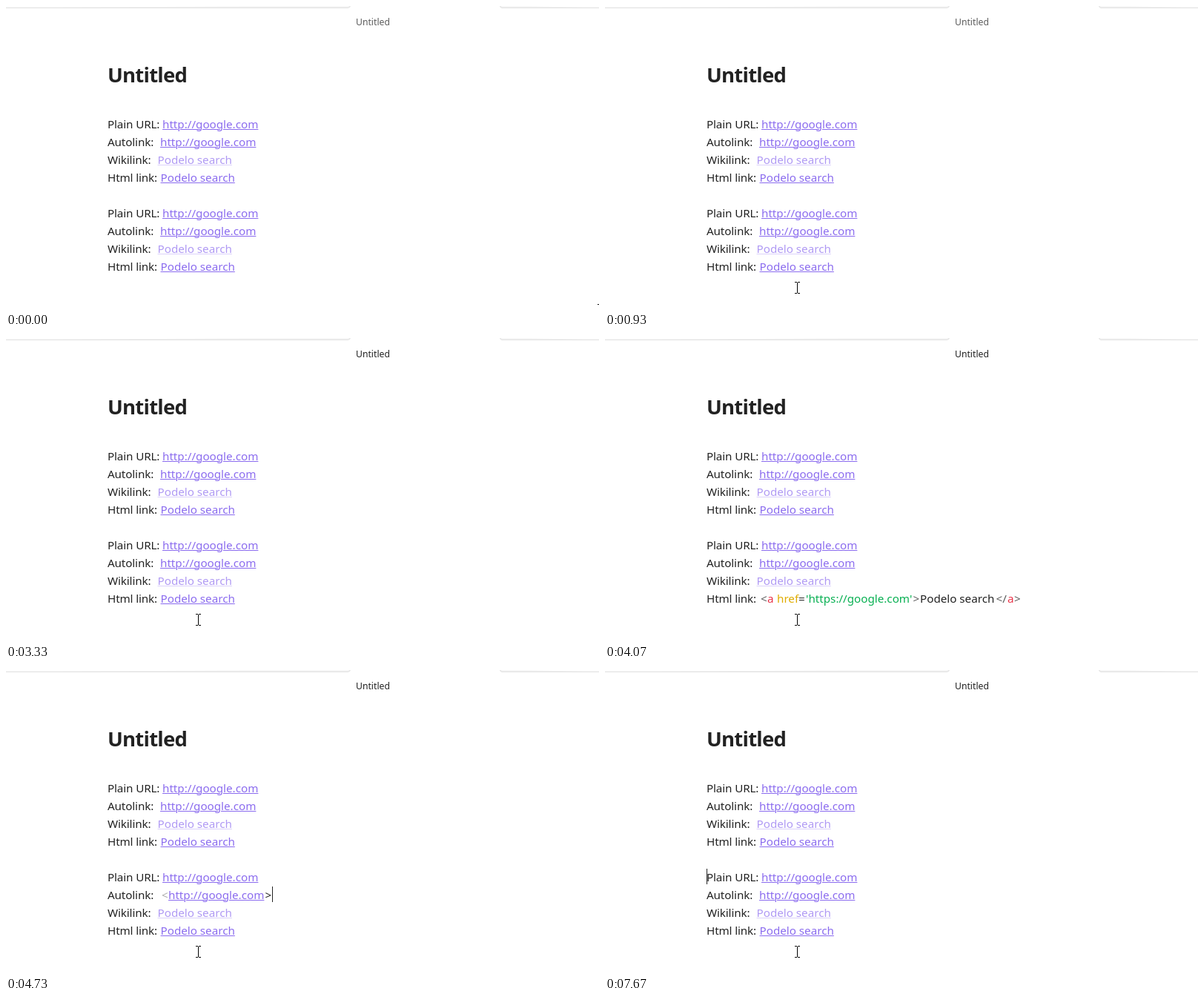
An HTML page that plays this animation: 800 by 410 pixels, repeating every 8000 ms.

```html
<!DOCTYPE html>
<html lang="en">
<head>
<meta charset="utf-8">
<title>Link editing</title>
<style>
  html, body { margin: 0; width: 100%; height: 100%; overflow: hidden; background: #fff; }
  #stage { position: relative; width: 800px; height: 410px; overflow: hidden;
    font: 15.2px/24px "Noto Sans", sans-serif; color: #222; }
  #stage > svg, #stage span, #caret, h1 { position: absolute; margin: 0; white-space: pre; }
  h1 { left: 137px; top: 73px; font-size: 27.5px; line-height: 40px; letter-spacing: -.75px; }
  #stage #tab { left: 472px; top: 9.5px; font-size: 12.2px; }
  #caret { width: 1px; height: 21px; background: #222; }
  .name { letter-spacing: -.12px; }
  .link, .wiki { text-decoration: underline 1px; text-underline-offset: 1px; }
  .link { color: #8b6cef; }
  .wiki { color: #b09af4; text-decoration-color: #dcd2fb; }
  .faint { color: #ababab; }
  .mark { color: #5c5c5c; }
  .tag { color: #e93147; }
  .attr { color: #e0ac00; }
  .string { color: #08b052; }
</style>
</head>
<body>
<div id="stage">
  <svg width="800" height="4" fill="#f6f6f6" stroke="#dedede">
    <path d="M-1 2.5H461Q464.5 2.5 464.5-1M801 2.5H669Q666.5 2.5 666.5-1"/>
  </svg>
  <span id="tab">Untitled</span>
  <h1>Untitled</h1>
  <div id="caret"></div>
  <svg id="pointer" width="7" height="16" fill="#000">
    <path d="M0 0h3v1H0zM4 0h3v1H4zM3 1h1v14H3zM0 15h3v1H0zM4 15h3v1H4z"/>
  </svg>
</div>
<script>
const LOOP = 8000, STEP = 1000 / 15;
const URL_TEXT = 'http://google.com', LABEL = 'Podelo search';
const $ = id => document.getElementById(id);
const stage = $('stage'), tab = $('tab'), caret = $('caret'), pointer = $('pointer');

// Pieces are [text, x, class]
const lines = [
  { name: 'Plain URL:', view: [[URL_TEXT, 211, 'link']] },
  { name: 'Autolink:', view: [[URL_TEXT, 208, 'link']],
    code: [['<', 210, 'faint'], [URL_TEXT, 219, 'link'], ['>', 349.5, '']] },
  { name: 'Wikilink:', view: [[LABEL, 204.5, 'wiki']],
    code: [['[[', 204.5, 'faint'], [URL_TEXT, 214.5, 'wiki'], ['|', 343, 'faint'],
           [LABEL, 347.5, 'wiki'], [']]', 448, 'faint']] },
  { name: 'Html link:', view: [[LABEL, 208.5, 'link']],
    code: [['<', 210, 'mark'], ['a', 219, 'tag'], ['href', 232, 'attr'], ['=', 261, ''],
           ["'https://google.com'", 271, 'string'], ['>', 415.5, 'mark'], [LABEL, 425, ''],
           ['</', 527.5, 'mark'], ['a', 543, 'tag'], ['>', 552, 'mark']] }
];

function addPieces(pieces, top) {
  const group = stage.insertBefore(document.createElement('div'), caret);
  for (const [text, x, kind] of pieces) {
    const span = group.appendChild(document.createElement('span'));
    span.textContent = text;
    span.className = kind;
    span.style.left = x + 'px';
    span.style.top = top + 'px';
  }
  return group;
}

for (const top of [147, 267]) {
  lines.forEach((line, i) => {
    const y = top + 24 * i;
    addPieces([[line.name, 137, 'name']], y);
    line.viewGroup = addPieces(line.view, y);
    if (top === 267 && line.code) line.codeGroup = addPieces(line.code, y);
  });
}

// [start, caret x, caret y, expanded line]; no x means a hidden caret
const states = [
  [0], [1470, 137, 364], [2000], [2530, 137, 364], [2800, 137, 340], [3330],
  [3600, 562, 340, 3], [4070, null, 0, 3],
  [4130, 457, 316, 2], [4670, null, 0, 2],
  [4730, 359, 292, 1], [5270, null, 0, 1],
  [5530, 340, 268], [6070], [6600, 340, 268], [7130], [7670, 137, 268]
];

function draw(now) {
  const t = now % LOOP;
  const [, x, y, open] = states.findLast(s => s[0] <= t);
  caret.hidden = !x;
  caret.style.left = x + 'px';
  caret.style.top = y + 'px';
  tab.style.color = t < 1470 ? '#5c5c5c' : '#222';

  lines.forEach((line, i) => {
    if (!line.codeGroup) return;
    line.codeGroup.hidden = i !== open;
    line.viewGroup.hidden = i === open;
  });

  // The pointer slows down towards its resting place in 14 steps
  const step = Math.min(14, Math.floor((t + 3.4) / STEP));
  const left = (1 - step / 14) ** 2;
  pointer.style.left = 256 + Math.ceil(542 * left) + 'px';
  pointer.style.top = 372 + Math.ceil(30 * left) + 'px';
  requestAnimationFrame(tick);
}

const start = performance.now();
function tick() { draw(performance.now() - start); }
tick();
</script>
</body>
</html>
```
